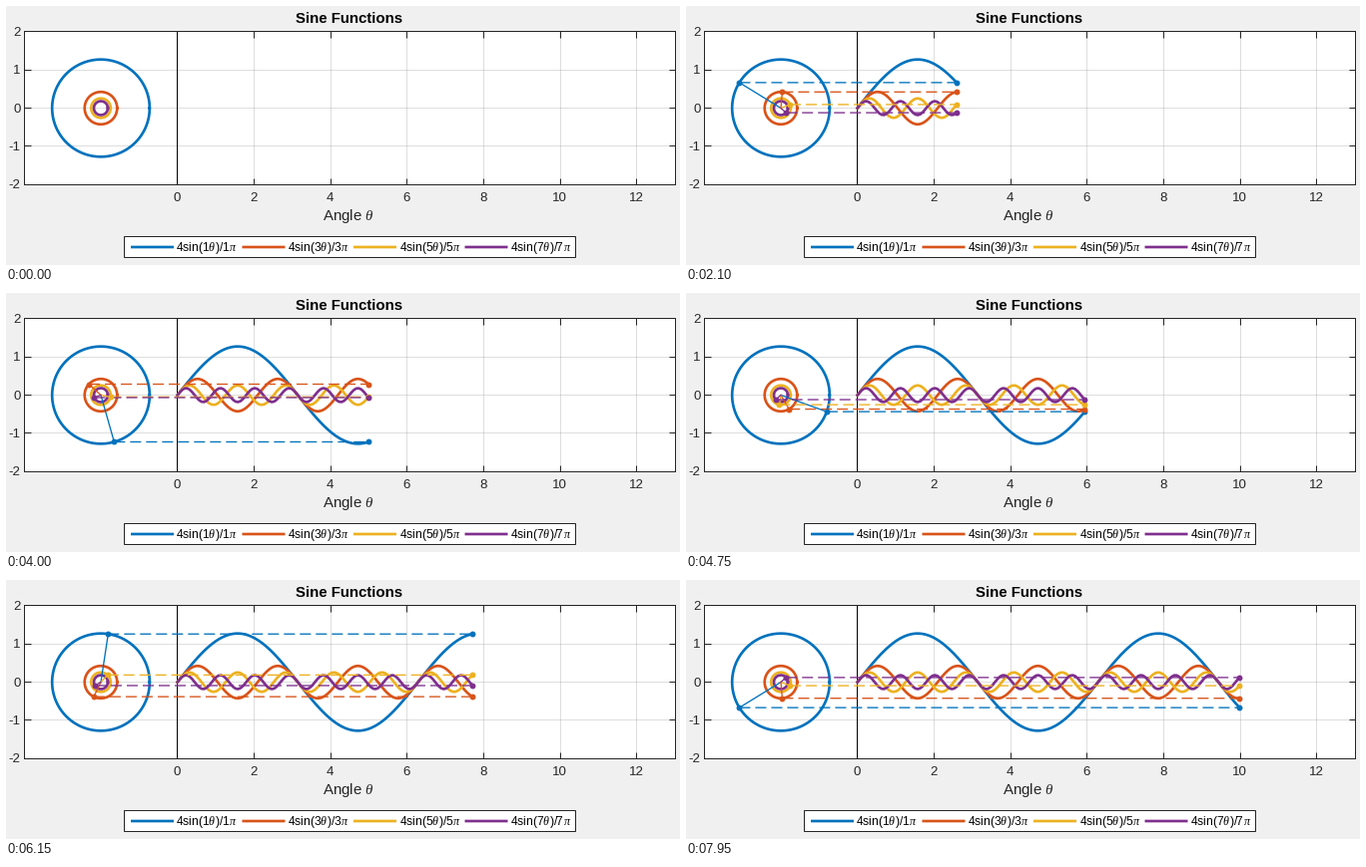
A matplotlib script for the animation above (8000 ms loop, 675 px wide and 260 px high).

```python
import numpy as np
import matplotlib.pyplot as plt
from matplotlib.animation import FuncAnimation
from matplotlib.patches import Rectangle
from matplotlib.transforms import ScaledTranslation

W, H, DPI = 675, 260, 100
FRAMES, INTERVAL = 160, 50
PX = 72 / DPI                      # points per pixel
UNIT = 652 / 17                    # pixels per data unit on both axes
LEFT, MIDDLE = 17.8, 102           # pixel of x = -4 and of y = 0
STEP = 4 * np.pi / 199             # angle advanced per frame
CENTER = -2
THICK, THIN = 2.67 * PX, 1.33 * PX
DARK = "#262626"
HARMONICS = [(1, "#0072bd"), (3, "#d95319"), (5, "#edb120"), (7, "#7e2f8e")]

plt.rcParams.update({
    "font.family": "Liberation Sans",
    "mathtext.fontset": "custom",
    "mathtext.rm": "Liberation Sans",
    "mathtext.it": "Liberation Serif:italic",
    "lines.scale_dashes": False,
})

fig = plt.figure(figsize=(W / DPI, H / DPI), dpi=DPI, facecolor="#f0f0f0")


def label(x, y, text, size, ha="center", **kw):
    """Text with its baseline at pixel (x, y), measured from the top left."""
    fig.text(x / W, 1 - y / H, text, fontsize=size * PX, ha=ha,
             va="baseline", **kw)


def build_axes():
    ax = fig.add_axes([LEFT / W, 1 - (MIDDLE + 2 * UNIT) / H,
                       17 * UNIT / W, 4 * UNIT / H])
    ax.set(xlim=(-4, 13), ylim=(-2, 2),
           xticks=range(0, 13, 2), yticks=range(-2, 3))
    ax.set_axisbelow(True)
    ax.grid(color=DARK, alpha=0.15, lw=PX)
    ax.tick_params(direction="in", top=True, right=True, length=6.5 * PX,
                   width=PX, color=DARK, labelbottom=False, labelleft=False)
    for spine in ax.spines.values():
        spine.set(linewidth=PX, color=DARK)
    ax.axvline(0, color="black", lw=PX, zorder=1.5)

    for v in range(0, 13, 2):
        label(LEFT + (v + 4) * UNIT, 196, str(v), 13.3, color=DARK)
    for v in range(-2, 3):
        label(14.5, MIDDLE - v * UNIT + 4.7, str(v), 13.3, "right",
              color=DARK)
    label(343.5, 17, "Sine Functions", 15, weight="bold", color="black")
    label(343, 215, r"Angle $\theta$", 15, color=DARK)
    return ax


def build_legend():
    fig.add_artist(Rectangle((118 / W, 1 - 252 / H), 452 / W, 21 / H,
                             fc="white", ec=DARK, lw=PX))
    for i, (n, color) in enumerate(HARMONICS):
        x = 125 + 111.5 * i
        fig.add_artist(plt.Line2D([x / W, (x + 43) / W], [1 - 242 / H] * 2,
                                  color=color, lw=THICK, snap=False,
                                  solid_capstyle="butt"))
        text = rf"4sin({n}$\theta\hspace{{0.06}}$)/{n}$\hspace{{0.1}}\pi$"
        label(x + 45.5, 246, text, 12, "left", color="black")


class Wheel:
    """A rotating phasor with the sine curve that it traces."""

    def __init__(self, ax, n, color, z):
        self.n, self.r = n, 4 / (n * np.pi)
        # curves run through pixel centres
        shift = ScaledTranslation(0.5 / DPI, -0.5 / DPI, fig.dpi_scale_trans)

        def line(layer, *args, **kw):
            return ax.plot(*args, color=color, zorder=layer + z, snap=False,
                           transform=ax.transData + shift, **kw)[0]

        t = np.linspace(0, 2 * np.pi, 200)
        line(2, CENTER + self.r * np.cos(t), self.r * np.sin(t), lw=THICK)
        self.wave = line(3, [], [], lw=THICK)
        self.arm = line(4, [], [], lw=THIN)
        self.link = line(4, [], [], lw=THIN, dashes=(11 * PX, 5 * PX),
                         dash_capstyle="butt")
        self.dots = line(5, [], [], "o", ms=5.9 * PX, mew=0)

    def turn(self, angles):
        if len(angles) == 0:
            for line in (self.wave, self.arm, self.link, self.dots):
                line.set_data([], [])
            return
        now = angles[-1]
        x = CENTER + self.r * np.cos(self.n * now)
        y = self.r * np.sin(self.n * now)
        self.wave.set_data(angles, self.r * np.sin(self.n * angles))
        self.arm.set_data([CENTER, x], [0, y])
        self.link.set_data([x, now], [y, y])
        self.dots.set_data([x, now], [y, y])


ax = build_axes()
build_legend()
wheels = [Wheel(ax, n, color, 0.1 * i)
          for i, (n, color) in enumerate(HARMONICS)]
ax.set(xlim=(-4, 13), ylim=(-2, 2))


def update(frame):
    angles = STEP * np.arange(frame)
    for wheel in wheels:
        wheel.turn(angles)


anim = FuncAnimation(fig, update, frames=FRAMES, interval=INTERVAL,
                     init_func=lambda: update(0), repeat=True,
                     repeat_delay=0, blit=False)
plt.show()
```
